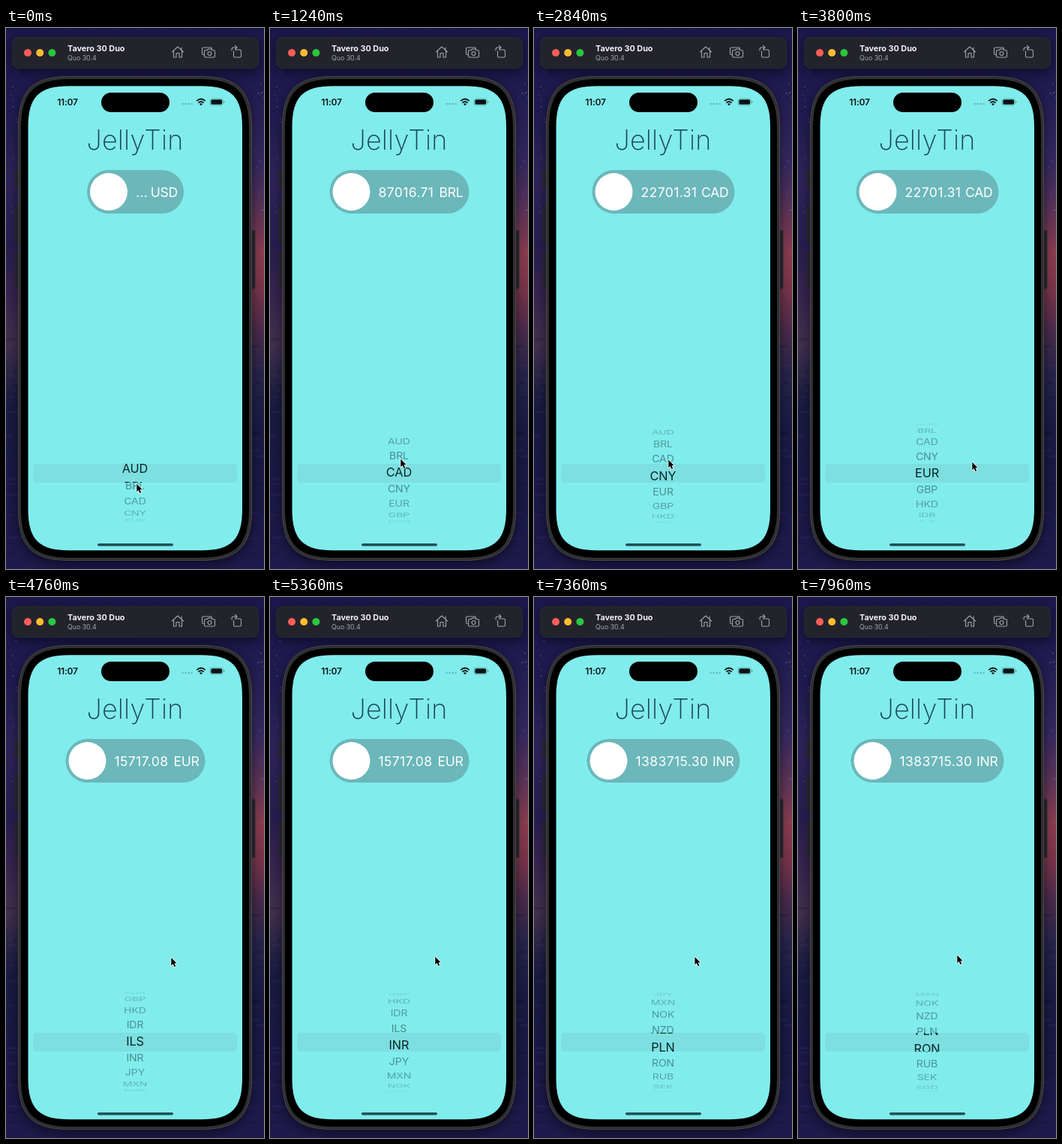
These frames come from a looping animation (344 by 720 pixels, 8 s). An HTML page with a canvas:

```html
<!DOCTYPE html>
<html lang="en">
<head>
<meta charset="utf-8">
<title>Currency picker</title>
<style>
  html, body { margin: 0; width: 100%; height: 100%; overflow: hidden; background: #19184a; }
  canvas { display: block; width: 344px; height: 720px; }
</style>
</head>
<body>
<canvas id="stage"></canvas>
<script>
const W = 344, H = 720, LOOP = 8000;
const canvas = document.getElementById('stage');
const ctx = canvas.getContext('2d');
const ratio = window.devicePixelRatio || 1;
canvas.width = W * ratio;
canvas.height = H * ratio;

const CODES = 'AUD BRL CAD CNY EUR GBP HKD IDR ILS INR JPY MXN NOK NZD PLN RON RUB SEK SGD USD ZAR'.split(' ');
const QUOTES = [
  { from: 0, amount: '...', code: 'USD', width: 129 },
  { from: 720, amount: '87016.71', code: 'BRL', width: 186 },
  { from: 1720, amount: '22701.31', code: 'CAD', width: 190 },
  { from: 4320, amount: '15717.08', code: 'EUR', width: 186 },
  { from: 6920, amount: '1383715.30', code: 'INR', width: 204 },
];
const WHEEL = [[0, .25], [120, .25], [520, 1], [900, 1], [1240, 2.05], [1480, 2], [2500, 2], [2950, 3], [3250, 3], [3700, 4]];
const POINTER = [
  [0, 174, 606], [120, 174, 606], [420, 174, 575], [680, 174, 575], [900, 174, 604], [1180, 174, 573],
  [1480, 174, 573], [2000, 178, 600], [2500, 179, 605], [2800, 179, 574], [3000, 179, 574],
  [3300, 215, 602], [3560, 232, 577], [3900, 232, 577], [4140, 225, 588], [4320, 220, 480],
  [5360, 220, 478], [5800, 220, 478], [6400, 217, 588], [6560, 217, 588], [6640, 217, 481], [7960, 212, 476],
];

// Smooth interpolation of one column in a list of [time, value, ...] keys.
function sample(keys, t, column = 1) {
  const i = keys.findIndex(k => k[0] > t);
  if (i < 0) return keys[keys.length - 1][column];
  const a = keys[i - 1], b = keys[i];
  const u = (t - a[0]) / (b[0] - a[0]);
  return a[column] + (b[column] - a[column]) * u * u * (3 - 2 * u);
}

const fling = (from, to, elapsed, decay) => to - (to - from) * Math.exp(-elapsed / decay);

function wheelPosition(t) {
  if (t < 4160) return sample(WHEEL, t);
  if (t < 5900) return fling(4, 9, t - 4160, 360);
  if (t < 6560) return 9;
  if (t < 6640) return 9 + .25 * (t - 6560) / 80;
  return fling(9.25, 15, t - 6640, 480);
}

function paint(shape, fill, stroke, line = 1) {
  if (fill) { ctx.fillStyle = fill; ctx.fill(shape); }
  if (stroke) { ctx.strokeStyle = stroke; ctx.lineWidth = line; ctx.stroke(shape); }
}

function box(x, y, w, h, r, fill, stroke, line) {
  const shape = new Path2D();
  shape.roundRect(x, y, w, h, r);
  paint(shape, fill, stroke, line);
}

// Rectangle whose corners ease gradually into the sides, starting "reach" before each corner.
function smoothBox(x, y, w, h, reach, fill, stroke, line) {
  const r = x + w, b = y + h, c = reach * .26;
  const shape = new Path2D();
  shape.moveTo(x + reach, y);
  shape.lineTo(r - reach, y);
  shape.bezierCurveTo(r - c, y, r, y + c, r, y + reach);
  shape.lineTo(r, b - reach);
  shape.bezierCurveTo(r, b - c, r - c, b, r - reach, b);
  shape.lineTo(x + reach, b);
  shape.bezierCurveTo(x + c, b, x, b - c, x, b - reach);
  shape.lineTo(x, y + reach);
  shape.bezierCurveTo(x, y + c, x + c, y, x + reach, y);
  shape.closePath();
  paint(shape, fill, stroke, line);
}

function dot(x, y, r, fill) {
  ctx.beginPath();
  ctx.arc(x, y, r, 0, 7);
  ctx.fillStyle = fill;
  ctx.fill();
}

function label(text, x, y, size, weight, fill, align = 'left', spacing = 0) {
  ctx.font = `${weight} ${size}px Inter, sans-serif`;
  ctx.letterSpacing = spacing + 'px';
  ctx.textAlign = align;
  ctx.fillStyle = fill;
  ctx.fillText(text, x, y);
}

function withShadow(draw) {
  ctx.save();
  ctx.shadowColor = 'rgba(0,0,10,.55)';
  ctx.shadowBlur = 16 * ratio;
  ctx.shadowOffsetY = 5 * ratio;
  draw();
  ctx.restore();
}

function verticalGradient(...stops) {
  const g = ctx.createLinearGradient(0, 0, 0, H);
  stops.forEach(([at, color]) => g.addColorStop(at / H, color));
  return g;
}

function drawSky() {
  ctx.fillStyle = verticalGradient([0, '#1b174a'], [110, '#1f1b4f'], [200, '#2e2359'], [290, '#271e50'],
    [350, '#37244f'], [420, '#43304f'], [460, '#2c2547'], [500, '#181b3f'], [600, '#191845'], [720, '#1e1a4b']);
  ctx.fillRect(0, 0, 172, H);
  ctx.fillStyle = verticalGradient([0, '#1b174a'], [70, '#1e1a4d'], [180, '#35295f'], [240, '#5a3458'],
    [300, '#8a3d4e'], [350, '#793449'], [400, '#4c2c4a'], [460, '#262449'], [540, '#181a42'], [720, '#1e1a4b']);
  ctx.fillRect(172, 0, 172, H);

  let seed = 11;
  const random = () => (seed = seed * 16807 % 2147483647) / 2147483647;
  const side = width => random() < .5 ? random() * width : W - random() * width;
  for (let i = 0; i < 40; i++) {
    dot(side(18), 56 + random() * 190, .35 + random() * .6, `rgba(190,180,235,${.15 + random() * .35})`);
  }
  for (let i = 0; i < 50; i++) {
    ctx.fillStyle = random() < .5 ? 'rgba(10,10,40,.22)' : 'rgba(90,60,110,.16)';
    ctx.fillRect(side(20) - 8, 380 + random() * 340, 8 + random() * 14, 1 + random() * 3);
  }
}

function drawToolbar() {
  withShadow(() => box(8, 12, 329, 42, 9, '#23232b'));
  box(8.3, 12.3, 328.4, 41.4, 9, null, '#2e2e37', .6);
  ['#ff5f57', '#febc2e', '#28c840'].forEach((c, i) => dot(29 + i * 16.2, 33, 5, c));
  label('Tavero 30 Duo', 82, 31, 10.8, 700, '#f2f2f4');
  label('Quo 30.4', 82, 43, 8.8, 400, '#a5a5ac');
  ctx.lineJoin = ctx.lineCap = 'round';
  const icon = d => paint(new Path2D(d), null, '#a2a2a9', 1.1);
  icon('M221.5 32L229 25L236.5 32M223.5 31V39H227V33.5H231V39H234.5V31M234 29.5V26');
  icon('M264 35.5H263Q261.5 35.5 261.5 34V27.5Q261.5 26 263 26H273Q274.5 26 274.5 27.5');
  icon('M266 29.5H268.5L270 28H273.5L275 29.5H277Q278.5 29.5 278.5 31V37.5Q278.5 39 277 39H266Q264.5 39 264.5 37.5V31Q264.5 29.5 266 29.5Z');
  icon('M274 34A2.5 2.5 0 1 1 269 34A2.5 2.5 0 1 1 274 34');
  icon('M303.5 31V37.5Q303.5 39 305 39H312Q313.5 39 313.5 37.5V30.5Q313.5 29 312 29H306');
  icon('M301 30V28.5Q301 26 303.5 26H308M305.5 23.5L308 26L305.5 28.5');
}

function drawPhone() {
  [[12, 189, 24], [12, 237, 48], [12, 298, 48], [327, 269, 78]].forEach(([x, y, h]) =>
    box(x, y, 5, h, 1.5, '#29282c', '#36343a', .6));
  withShadow(() => smoothBox(16, 64, 312, 645, 70, '#2b2a2c'));
  smoothBox(16.5, 64.5, 311, 644, 69.5, null, '#4a494b', 1);
  smoothBox(19, 67, 306, 639, 67, null, '#39383a', 1);
  smoothBox(20, 68, 304, 637, 66, '#000');
  smoothBox(29.5, 77.3, 285.5, 618, 55, '#81ecec');
}

function drawStatus() {
  label('11:07', 82, 103, 12, 600, '#0b1717', 'center', -.2);
  box(127, 86, 91, 26, 13, '#000');
  for (let i = 0; i < 4; i++) dot(235.6 + i * 4, 101, 1.2, '#66b5b8');
  const ink = '#081414';
  ctx.lineCap = 'butt';
  paint(new Path2D('M254.3 97.2Q260 91.8 265.7 97.2M256.5 99.6Q260 96.3 263.5 99.6'), null, ink, 1.8);
  paint(new Path2D('M258 101.2Q260 99.5 262 101.2L260 103.3Z'), ink);
  box(272, 94, 17.5, 9, 2.8, null, '#5aa5a7', .8);
  box(273.3, 95.3, 14.9, 6.4, 1.8, ink);
  box(290.4, 97, 1.2, 3, .6, '#5aa5a7');
}

function drawQuote(t) {
  const { amount, code, width } = QUOTES.filter(q => q.from <= t).pop();
  const left = 172.5 - width / 2;
  box(left, 189, width, 58, 29, '#6bb7ba');
  dot(left + 29, 218, 25, '#fff');
  label(amount, left + 65, 224.5, 17.6, 400, '#fff', 'left', .35);
  label(code, left + width - 8, 224.5, 17.6, 400, '#fff', 'right', -.3);
}

const AXIS = 592.3, RADIUS = 66.5, STEP = .337;

function drawRows(position, lens) {
  CODES.forEach((code, i) => {
    const angle = (i - position) * STEP;
    if (Math.abs(angle) > 1.5) return;
    const zoom = lens ? 1.07 : 1;
    ctx.save();
    ctx.translate(172, AXIS + RADIUS * zoom * Math.sin(angle));
    ctx.scale(1, Math.cos(angle));
    ctx.globalAlpha = lens ? 1 : .5 * Math.cos(angle);
    const size = lens ? 16.3 : 14.1;
    label(code, 0, size * .364, size, 400, '#092528', 'center', -.1);
    ctx.restore();
  });
}

function drawPicker(position) {
  const top = 580, bottom = 605;
  box(36, top, 272, bottom - top, 5, '#7ddfe0');
  const clipped = (bands, lens) => {
    ctx.save();
    ctx.beginPath();
    bands.forEach(([y0, y1]) => ctx.rect(36, y0, 272, y1 - y0));
    ctx.clip();
    drawRows(position, lens);
    ctx.restore();
  };
  clipped([[515, top], [bottom, 670]], false);
  clipped([[top, bottom]], true);
}

function drawPointer(x, y) {
  ctx.save();
  ctx.translate(x + .3, y + .8);
  ctx.scale(.9, .9);
  ctx.lineJoin = 'round';
  const arrow = new Path2D('M0 0V11.5L2.6 9.2L4.6 13.6L6.6 12.7L4.7 8.4H8.2Z');
  paint(arrow, null, '#fff', 1.6);
  paint(arrow, '#000');
  ctx.restore();
}

function render(t) {
  ctx.setTransform(ratio, 0, 0, ratio, 0, 0);
  drawSky();
  drawToolbar();
  drawPhone();
  drawStatus();
  label('JellyTin', 172, 162, 36, 200, '#1b4553', 'center', .2);
  drawQuote(t);
  drawPicker(wheelPosition(t));
  box(122, 686, 101, 3.6, 1.8, '#1f5157');
  drawPointer(sample(POINTER, t, 1), sample(POINTER, t, 2));
}

const start = performance.now();
function tick() {
  render((performance.now() - start) % LOOP);
  requestAnimationFrame(tick);
}
tick();
</script>
</body>
</html>
```
